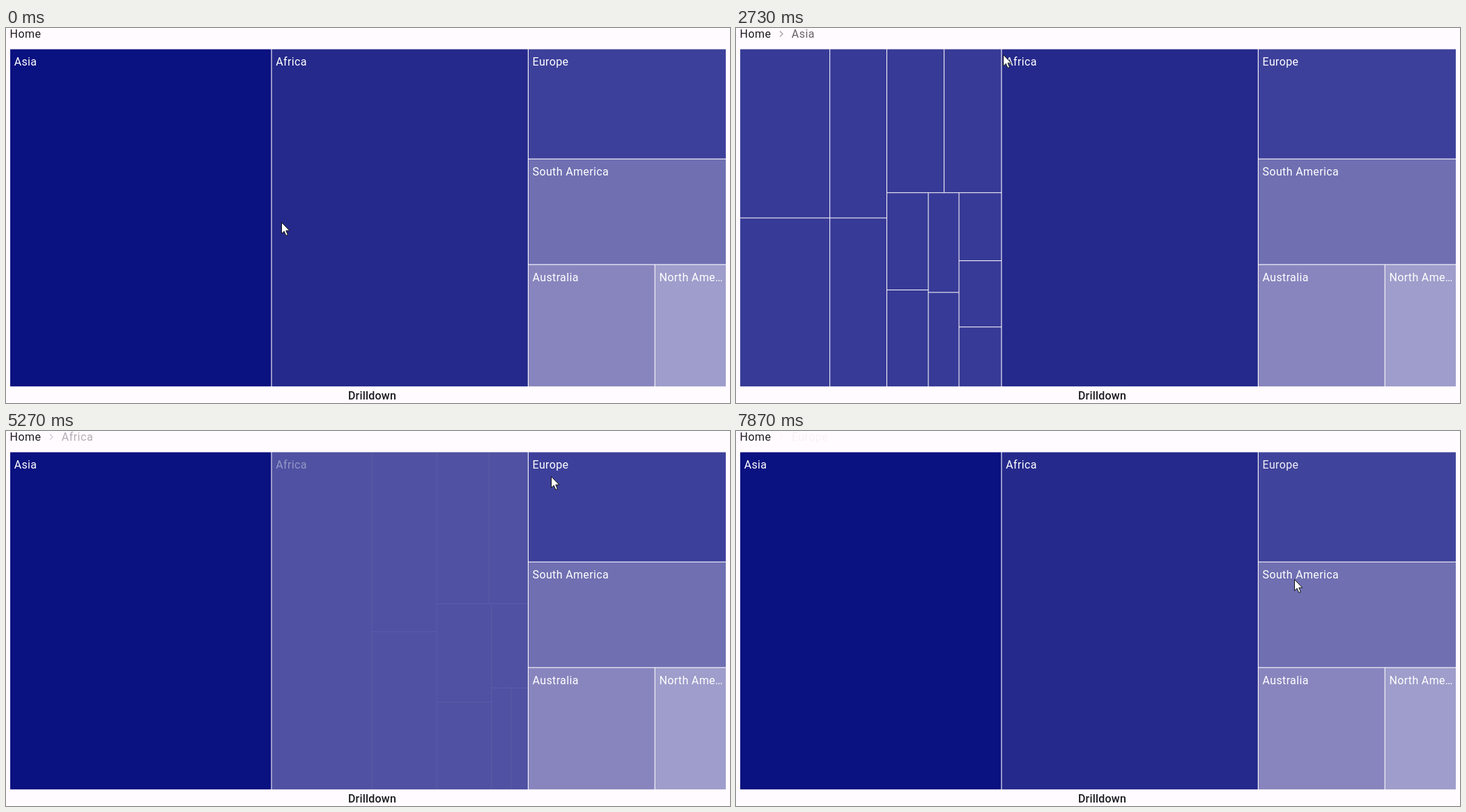
Write an HTML page with a canvas that moves like this. It is 1039 px wide and 539 px high and loops after 8000 ms.

```html
<!DOCTYPE html>
<html lang="en">
<head>
<meta charset="utf-8">
<title>Drilldown</title>
<style>
  html, body { margin: 0; width: 100%; height: 100%; overflow: hidden; background: #fffbff; }
  canvas { display: block; width: 1039px; height: 539px; }
</style>
</head>
<body>
<canvas id="stage" width="1039" height="539"></canvas>
<script>
const ctx = document.getElementById('stage').getContext('2d');
const LOOP = 8000, DURATION = 1000, CRUMB_LEAD = 60;
const INK = '#1c1b1f', CHILD_FILL = 'rgb(48,51,146)';

// Rectangles are [left, top, right, bottom].
const L = 5.5, T = 30, R = 1033.5, B = 515.7;
const FULL = [L, T, R, B];

const home = [
  { name: 'Asia', fill: 'rgb(10,17,128)', rect: [L, T, 381, B] },
  { name: 'Africa', fill: 'rgb(37,41,139)', rect: [381, T, 749.4, B] },
  { name: 'Europe', fill: 'rgb(61,64,154)', rect: [749.4, T, R, 188.2] },
  { name: 'South America', fill: 'rgb(111,111,178)', rect: [749.4, 188.2, R, 340] },
  { name: 'Australia', fill: 'rgb(136,133,190)', rect: [749.4, 340, 931.2, B] },
  { name: 'North America', fill: 'rgb(158,157,203)', rect: [931.2, 340, R, B] },
];

const children = {
  Asia: [
    ['Chennai', L, T, 359, 273], ['Dhaka', L, 273, 359, B],
    ['Hong Kong', 359, T, 583, 273], ['Nagoya', 359, 273, 583, B],
    ['Tokyo', 583, T, 808, 236.7], ['Wenzhou', 808, T, R, 236.7],
    ['Shenzhen', 583, 236.7, 746, 376.5], ['Baku', 583, 376.5, 746, B],
    ['Tianjin', 746, 236.7, 866.5, 380], ['Taipei', 746, 380, 866.5, B],
    ['Tehran', 866.5, 236.7, R, 334.5], ['Beijing', 866.5, 334.5, R, 429.7],
    ['kabul', 866.5, 429.7, R, B],
  ],
  Africa: [
    ['Ibadan', L, T, 407, B],
    ['Uganda', 407, T, 667, 288.6], ['Accra', 407, 288.6, 667, B],
    ['Alexandria', 667, T, 876, 248.2], ['Bangui', 876, T, R, 248.2],
    ['Lubumbashi', 667, 248.2, 886.4, 389.6], ['Maputo', 667, 389.6, 886.4, B],
    ['Cairo', 886.4, 248.2, R, 369.2],
    ['Kinshasa', 886.4, 369.2, 965.3, B], ['Cape T…', 965.3, 369.2, R, B],
  ],
  Europe: [
    ['London', L, T, 330, 280], ['Berlin', L, 280, 330, B],
    ['Madrid', 330, T, 590, 268], ['Rome', 330, 268, 590, B],
    ['Paris', 590, T, 834, 246], ['Vienna', 834, T, R, 246],
    ['Prague', 590, 246, 834, B], ['Lisbon', 834, 246, R, B],
  ],
};

const visits = [
  { name: 'Asia', enter: 880, leave: 2220 },
  { name: 'Africa', enter: 3350, leave: 4520 },
  { name: 'Europe', enter: 5720, leave: 6950 },
];

// Pointer keys: time, x, y.
const pointerKeys = [
  [0, 395, 279], [50, 395, 279], [670, 32, 49], [870, 32, 49], [1330, 35, 4],
  [2150, 35, 4], [2730, 383, 38], [3200, 447, 56], [3380, 447, 56],
  [4130, 4, 2], [4270, 22, 12], [4440, 22, 12], [5270, 782, 65], [5470, 784, 70],
  [5720, 784, 70], [6070, 249, 69], [6530, 4, 23], [6730, 24, 12],
  [6950, 24, 12], [7870, 801, 213], [8000, 801, 213],
];

const clamp = v => Math.min(1, Math.max(0, v));
const decelerate = v => 1 - (1 - clamp(v)) ** 2;
const lerp = (a, b, k) => a + (b - a) * k;
const lerpRect = (a, b, k) => a.map((v, i) => lerp(v, b[i], k));

// Carries a rectangle along with the affine map that takes `from` to `to`.
function mapRect(rect, from, to) {
  return rect.map((v, i) => {
    const a = i % 2, scale = (to[a + 2] - to[a]) / (from[a + 2] - from[a]);
    return to[a] + (v - from[a]) * scale;
  });
}

function text(str, x, y, { color = INK, weight = 400, spacing = 0.35, alpha = 1, align = 'left' } = {}) {
  ctx.font = `${weight} 16px Roboto, sans-serif`;
  ctx.letterSpacing = spacing + 'px';
  ctx.textAlign = align;
  ctx.globalAlpha = alpha;
  ctx.fillStyle = color;
  ctx.fillText(str, x, y);
  ctx.globalAlpha = 1;
}

function fit(str, width) {
  ctx.font = '400 16px Roboto, sans-serif';
  ctx.letterSpacing = '0.35px';
  if (ctx.measureText(str).width <= width) return str;
  let n = str.length;
  while (n > 1 && ctx.measureText(str.slice(0, n) + '…').width > width) n--;
  return str.slice(0, n) + '…';
}

function tile(label, [x0, y0, x1, y1], fill, alpha, labelAlpha) {
  ctx.globalAlpha = alpha;
  ctx.fillStyle = fill;
  ctx.fillRect(x0 + 0.55, y0 + 0.55, x1 - x0 - 1.1, y1 - y0 - 1.1);
  if (labelAlpha > 0) text(label, x0 + 6.2, y0 + 23.6, { color: '#fff', alpha: labelAlpha });
  ctx.globalAlpha = 1;
}

function drawMap(t) {
  const visit = visits.find(v => t >= v.enter && t < v.leave + DURATION);
  const name = visit && visit.name;
  const leaving = visit && t >= visit.leave;
  const progress = visit ? (t - (leaving ? visit.leave : visit.enter)) / DURATION : 0;
  const move = decelerate(progress * 2), fade = decelerate(progress * 2 - 1);
  const zoom = leaving ? 1 - move : move;
  const parentAlpha = leaving ? fade : 1 - fade;

  const focus = visit ? home.find(h => h.name === name).rect : FULL;
  const view = visit ? lerpRect(focus, FULL, zoom) : FULL;

  ctx.save();
  ctx.beginPath();
  ctx.rect(5, T, 1029, 486);
  ctx.clip();
  for (const h of home) {
    const rect = mapRect(h.rect, focus, view);
    const own = h.name === name;
    const alpha = own ? parentAlpha : 1;
    tile(fit(h.name, rect[2] - rect[0] - 6.5), rect, h.fill, alpha, own && leaving ? alpha * alpha : alpha);
  }
  const childAlpha = 1 - parentAlpha;
  if (visit && childAlpha > 0) {
    for (const [label, ...rect] of children[name]) {
      tile(label, mapRect(rect, FULL, view), CHILD_FILL, childAlpha, leaving ? 1 - move : childAlpha);
    }
  }
  ctx.restore();
}

function drawCrumbs(t) {
  text('Home', 5.5, 14.3, { spacing: 0.5 });
  for (const { name, enter, leave } of visits) {
    const out = clamp((t - leave + CRUMB_LEAD) / DURATION);
    const alpha = out > 0 ? 1 - out * out : decelerate((t - enter) / DURATION);
    if (alpha <= 0) continue;
    text(name, 79.7, 14.3, { spacing: 0.5, alpha });
    ctx.globalAlpha = alpha;
    ctx.strokeStyle = '#77757a';
    ctx.lineWidth = 1.3;
    ctx.beginPath();
    ctx.moveTo(63, 4.5);
    ctx.lineTo(67, 8.5);
    ctx.lineTo(63, 12.5);
    ctx.stroke();
    ctx.globalAlpha = 1;
  }
}

// Monotone cubic interpolation, at rest wherever the pointer pauses or turns.
function pointerAt(t, axis) {
  const slope = i => {
    const a = pointerKeys[i], b = pointerKeys[i + 1];
    return a && b ? (b[axis] - a[axis]) / (b[0] - a[0]) : 0;
  };
  const tangent = i => {
    const m = slope(i - 1), n = slope(i);
    return m * n > 0 ? 2 * m * n / (m + n) : 0;
  };
  const i = pointerKeys.findIndex((k, n) => n === pointerKeys.length - 2 || t < pointerKeys[n + 1][0]);
  const a = pointerKeys[i], b = pointerKeys[i + 1];
  const span = b[0] - a[0], u = (t - a[0]) / span, w = 1 - u;
  return a[axis] * (1 + 2 * u) * w * w + b[axis] * u * u * (3 - 2 * u)
    + span * (tangent(i) * u * w * w - tangent(i + 1) * u * u * w);
}

const arrow = new Path2D('M.5 .5V16.6L4.2 13.2L6.8 19.4L9.4 18.3L6.8 12.2H11.8Z');

function drawPointer(t) {
  ctx.save();
  ctx.translate(pointerAt(t, 1), pointerAt(t, 2));
  ctx.fillStyle = '#fff';
  ctx.strokeStyle = '#111';
  ctx.lineWidth = 1;
  ctx.fill(arrow);
  ctx.stroke(arrow);
  ctx.restore();
}

function render(now) {
  const t = now % LOOP;
  ctx.fillStyle = '#fffbff';
  ctx.fillRect(0, 0, 1039, 539);
  drawMap(t);
  drawCrumbs(t);
  text('Drilldown', 525.5, 534.4, { weight: 500, spacing: 0.2, align: 'center' });
  drawPointer(t);
}

const start = performance.now();
function tick() {
  render(performance.now() - start);
  requestAnimationFrame(tick);
}
tick();
</script>
</body>
</html>
```
